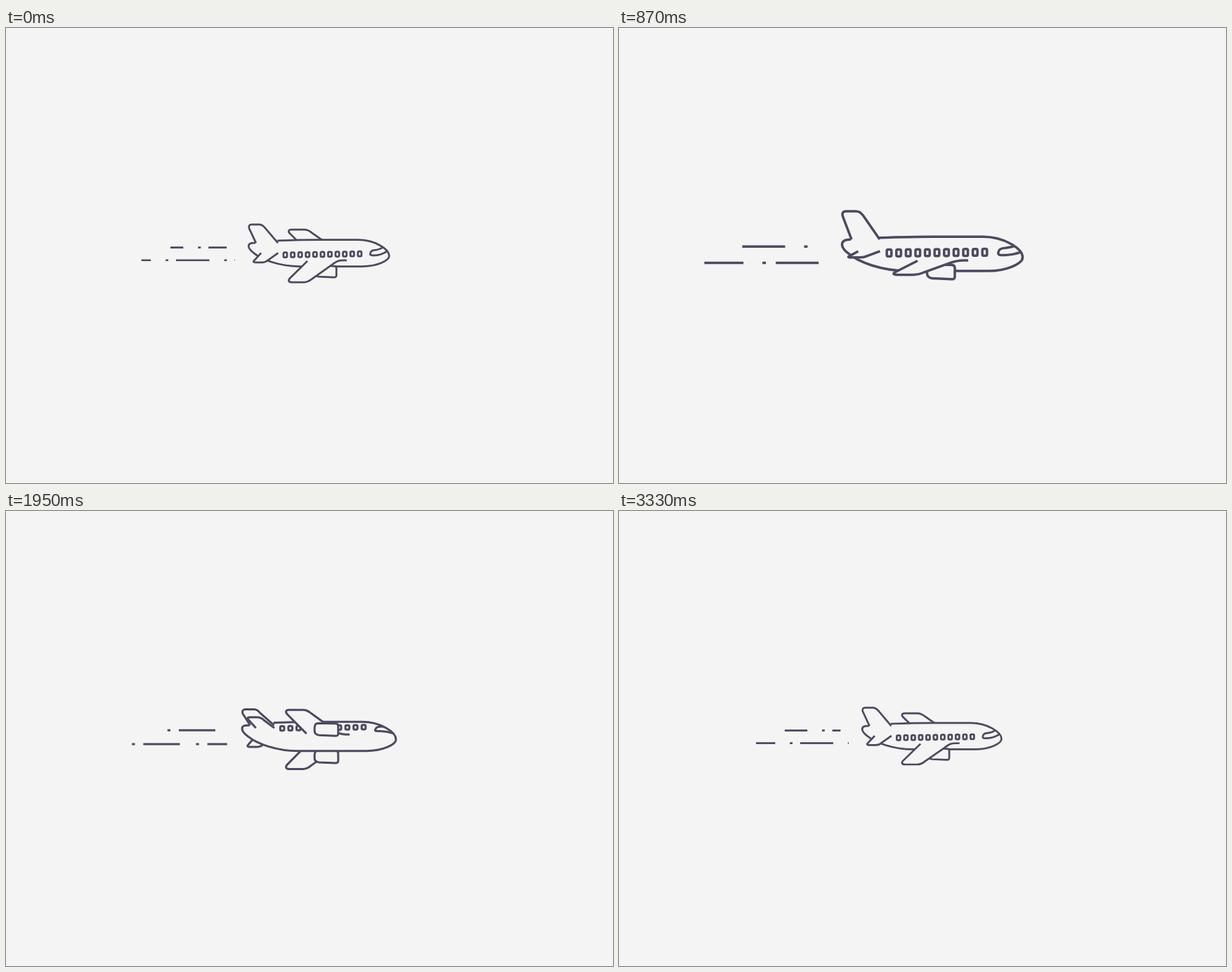
These frames come from a looping animation (864 px wide and 648 px high, 3.36 s). An HTML page with a canvas:

```html
<!DOCTYPE html>
<html lang="en">
<head>
<meta charset="utf-8">
<title>Airplane</title>
<style>
html, body { margin: 0; width: 100%; height: 100%; overflow: hidden; background: #f4f4f4; }
canvas { display: block; }
</style>
</head>
<body>
<canvas id="stage" width="864" height="648"></canvas>
<script>
const ctx = document.getElementById('stage').getContext('2d');
const LOOP = 3360, HALF = LOOP / 2;
const INK = '#4c4a5f', PAPER = '#f4f4f4';

// Half a cycle each; the second half repeats with the sign flipped.
const ROLL = [[0, 48.1], [120, 50.5], [270, 49.4], [390, 45.5], [555, 40],
  [870, 24.8], [1140, 8.2], [1530, -33.2], [1650, -47.15]];
const ZOOM = [[0, -23.2], [270, 4], [390, 12], [540, 20.3], [870, 34],
  [1200, 38.6], [1530, 33.5], [1650, 25]];

// Outlines as x,k pairs; k is scaled by the roll.
const WING = 'M-21,.195 L-52.5,.84 C-57,.93 -55.5,1 -50,1 L-27,1 C-21,1 -18,.97 -13,.88 ' +
  'L23,.35 C33,.19 37,.17 44,.17 L51,.17';
const TAIL = 'M-105.5,.14 L-118,.42 C-121,.48 -119,.5 -115,.5 L-103,.5 C-98,.5 -95,.46 -92,.4 L-74.5,.14';
const ENGINE = 'M-1,-21 L28,-20.2 Q32,-20 32,-16 L32,-3.5 Q32,.3 28,.2 L0,-1 ' +
  'Q-7.5,-2 -7.5,-8 L-7.5,-13 Q-7.5,-21 -1,-21 Z';

function wave(t, keys) {
  const n = keys.length;
  const at = i => {
    const lap = Math.floor(i / n), [x, v] = keys[i - lap * n];
    return [x + lap * HALF, lap % 2 ? -v : v];
  };
  let i = 0;
  while (at(i + 1)[0] <= t) i++;
  const [a, b, c, d] = [at(i - 1), at(i), at(i + 1), at(i + 2)];
  const w = c[0] - b[0], u = (t - b[0]) / w;
  const m0 = w * (c[1] - a[1]) / (c[0] - a[0]);
  const m1 = w * (d[1] - b[1]) / (d[0] - b[0]);
  const u2 = u * u, u3 = u2 * u;
  return (2 * u3 - 3 * u2 + 1) * b[1] + (u3 - 2 * u2 + u) * m0 +
    (3 * u2 - 2 * u3) * c[1] + (u3 - u2) * m1;
}

const lift = (d, base, k) => new Path2D(d.replace(/(-?[\d.]+),(-?[\d.]+)/g,
  (_, x, y) => `${x},${base + y * k}`));

function draw(path) {
  ctx.fill(path);
  ctx.stroke(path);
}

const wing = h => draw(lift(WING, 9.5, h));
const tail = h => draw(lift(TAIL, -2.7, h));
const engine = h => draw(lift(ENGINE, 32 + .45 * h - Math.abs(h) * (h > 0 ? .11 : .13), 1));

function streak(x0, x1, y, dash) {
  ctx.setLineDash([61, 27, 5, 14]);
  ctx.lineDashOffset = x0 - dash;
  ctx.beginPath();
  ctx.moveTo(x0, y);
  ctx.lineTo(x1, y);
  ctx.stroke();
  ctx.setLineDash([]);
}

function streaks(t) {
  const step = (t / 30 + 107) % 112;
  const run = step < 38 ? step : step < 75 ? step - 38 : step - 75;
  const dash = -252.5 - 18.17 * (run - 8);
  streak(-324.5, -153.5, 17.4, dash);
  streak(-271.5, -168.5, -5.9, dash + 59.3);
}

function cockpit(h, body) {
  const mid = -1 + .12 * h, top = -6.3 + .11 * h;
  const low = 3.7 + h * (h > 0 ? .1 : .165);
  const topEnd = Math.min(top, -7), lowEnd = 4 - .085 * Math.abs(h);
  ctx.save();
  ctx.clip(body);
  ctx.stroke(new Path2D(`M118,${topEnd} Q111,${top - .8} 101,${top} Q95,${top + .6} 94,${mid}
    Q92.5,${low} 98,${low} L102,${low} Q114,${low} 126,${lowEnd}`));
  ctx.restore();
}

function windows(h) {
  const a = Math.abs(h), high = 10.7 - a * (h > 0 ? .04 : .07);
  for (let i = 0; i < 11; i++) {
    const y = -1.5 + .17 * h - .04 * a * (i / 10 - .5);
    ctx.beginPath();
    ctx.roundRect(-64.8 + 13.6 * i, y - high / 2, 6.6, high, 1.8);
    ctx.stroke();
  }
}

function plane(h) {
  const a = Math.abs(h);
  const tip = -65 + a * (h > 0 ? .357 : .492);
  const left = -18 + .08 * a, right = -18.5 + .09 * a;
  const body = new Path2D(`M-76,-18.4 C-45,-19.4 -20,-19.9 0,-19.9 H72 C102,-19.9 128.5,-3 128.5,9.5
    C128.5,18 107,28.8 79,28.8 H-35 C-72,28.8 -105,16 -118,5 C-125,0 -128.5,-4 -128.5,-8.5
    C-128.5,-13 -125,${left - .5} -116,${left}`);
  const fin = new Path2D(`M-115,${left} L-127.5,${tip + 7} Q-129.5,${tip} -122.5,${tip}
    H-109 C-104,${tip} -102,${tip + 2} -98.5,${tip + 6} L-75,${right}`);

  wing(-h);
  engine(-h);
  tail(-h);
  draw(body);
  windows(h);
  cockpit(h, body);
  draw(fin);
  // The engine hangs below the wing, so banking away brings it to the front.
  if (h > 0) {
    engine(h);
    wing(h);
  } else {
    wing(h);
    engine(h);
  }
  tail(h);
}

function render(now) {
  const t = now % LOOP;
  const scale = (224 + wave(t, ZOOM)) / 258;
  ctx.setTransform(1, 0, 0, 1, 0, 0);
  ctx.fillStyle = PAPER;
  ctx.fillRect(0, 0, 864, 648);
  ctx.setTransform(scale, 0, 0, scale, 443.2, 317.2);
  ctx.translate(2.8, 0);
  ctx.strokeStyle = INK;
  ctx.lineWidth = 3.5;
  ctx.lineJoin = 'round';
  streaks(t);
  plane(wave(t, ROLL));
}

const start = performance.now();
function tick() {
  render(performance.now() - start);
  requestAnimationFrame(tick);
}
tick();
</script>
</body>
</html>
```
